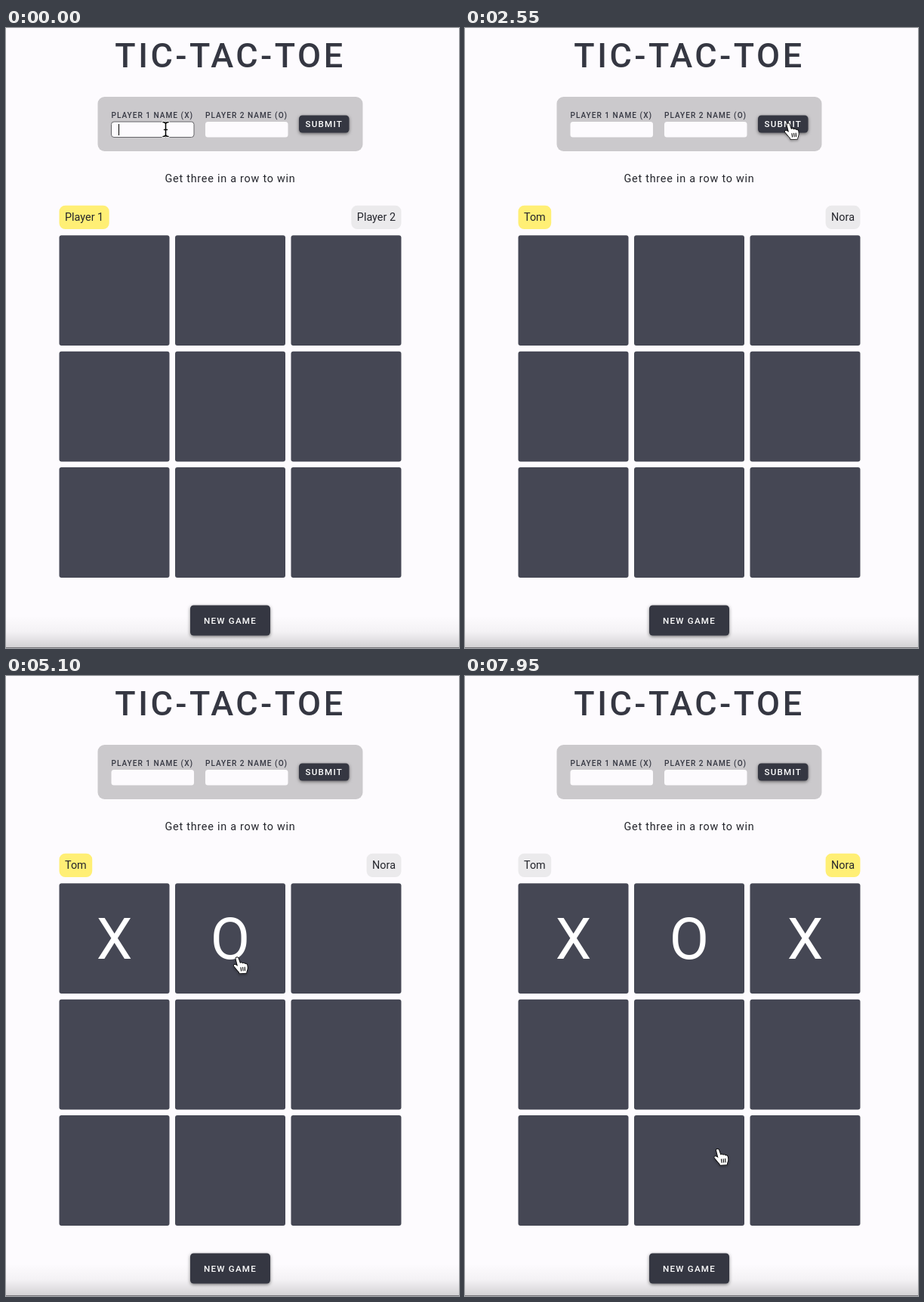
Recreate the animation shown at these times as an HTML page with a canvas. Size 600 by 820 pixels, loop 8000 ms.

```html
<!DOCTYPE html>
<html lang="en">
<head>
<meta charset="utf-8">
<title>Tic-Tac-Toe</title>
<style>
  html, body { margin: 0; width: 100%; height: 100%; overflow: hidden; background: #fdfbfe; }
  canvas { display: block; }
</style>
</head>
<body>
<canvas id="stage" width="600" height="820"></canvas>
<script>
const ctx = document.getElementById('stage').getContext('2d');
const LOOP = 8000, STEP = 50;
const DARK = '#353742', TILE = '#454754', PAPER = '#fdfbfe';
const NAMES = ['Tom', 'Nora'];
const KEY_TIMES = [[50, 200, 450], [1000, 1100, 1250, 1350]];
const FOCUS_CHANGE = 650, SUBMIT = 2350;
const MOVES = [[3850, 'X', 0], [4950, 'O', 1], [6700, 'X', 2]];

const FIELDS = [139.5, 264].map(x => ({ x, y: 124, w: 109.5, h: 20.5 }));
const SUBMIT_BUTTON = { x: 388, y: 115.5, w: 66.5, h: 23 };
const NEW_BUTTON = { x: 244, y: 763.5, w: 106, h: 40 };
const TILES = Array.from({ length: 9 }, (_, i) => ({
  x: 70.5 + 153.5 * (i % 3), y: 274.3 + 153.4 * Math.floor(i / 3), w: 146, h: 145.8
}));

const ease = {
  hold: () => 0,
  linear: p => p,
  start: p => p ** 1.4,
  stop: p => 1 - (1 - p) ** 2,
  both: p => p * p * (3 - 2 * p)
};
// Pointer stops: time, x, y, and the easing used to arrive there
const PATH = [
  [0, 211.5, 134], [1450, 211.5, 134, 'hold'], [1700, 307.5, 133, 'start'],
  [1800, 340, 132, 'linear'], [2150, 428, 128, 'stop'], [2650, 428, 128, 'hold'],
  [3200, 213, 352, 'both'], [3500, 185, 360, 'stop'], [3900, 185, 360, 'hold'],
  [4450, 220, 364, 'start'], [4700, 306, 374, 'stop'], [5900, 306, 374, 'hold'],
  [6150, 428.5, 368, 'start'], [6350, 450.5, 372, 'stop'], [7100, 450.5, 372, 'hold'],
  [7800, 368, 566, 'start'], [7950, 334.5, 627.5, 'linear'], [LOOP, 334.5, 627.5, 'hold']
];

const HAND = new Path2D('M-1.5 0C-2-2 .8-2.6 1.6-.8L4 6C4.8 4.8 6.8 4.8 7.3 6.3C8.3 5.3 10 5.6 10.4 7' +
  'C11.5 6.2 13 6.8 13.3 8.2L13.8 11.5C14 14 12.5 16 12.3 18.7L3.5 19.3C3 17 0 15-2 12' +
  'C-3 10.5-4.8 9.5-4 8.2C-3 7-1 8 1 10Z');
const HAND_LINES = new Path2D('M5 11.5L5.6 16M7.6 11.2L8.1 15.8M10.2 11L10.5 15.5');
const ARROW = new Path2D('M0 0V17.5L4 13.8L7.4 21.5L10.7 20L7.3 12.5H12.5Z');
const IBEAM = new Path2D('M-3.5-9.5Q0-9.5 0-7Q0-9.5 3.5-9.5M0-7V7M-3.5 9.5Q0 9.5 0 7Q0 9.5 3.5 9.5M-2 .5H2');

const clamp = v => Math.max(0, Math.min(1, v));
const fade = (t, start) => clamp((t - start + STEP) / 150);
const inside = (b, x, y) => x >= b.x && x <= b.x + b.w && y >= b.y && y <= b.y + b.h;
const mix = (a, b, p) => `rgb(${a.map((v, i) => Math.round(v + (b[i] - v) * p))})`;

function box({ x, y, w, h }, radius, fill, stroke) {
  ctx.beginPath();
  ctx.roundRect(x, y, w, h, radius);
  ctx.fillStyle = fill;
  ctx.fill();
  if (stroke) {
    ctx.strokeStyle = stroke;
    ctx.lineWidth = 1;
    ctx.stroke();
  }
}

function text(string, x, y, font, color, { spacing = 0, align = 'left' } = {}) {
  ctx.font = font;
  ctx.letterSpacing = spacing + 'px';
  ctx.textAlign = align;
  ctx.fillStyle = color;
  ctx.fillText(string, x, y);
  return ctx.measureText(string).width;
}

function shadow(color, blur, y) {
  ctx.shadowColor = color;
  ctx.shadowBlur = blur;
  ctx.shadowOffsetY = y;
}
const noShadow = () => shadow('transparent', 0, 0);

function button(b, label, baseline) {
  shadow('rgba(0,0,0,.5)', 4, 1.5);
  box(b, 4.5, DARK);
  noShadow();
  text(label, b.x + b.w / 2, baseline, '500 11.6px Roboto, sans-serif', '#fff', { spacing: 1.2, align: 'center' });
}

function drawForm(t) {
  box({ x: 121.5, y: 91, w: 351, h: 72 }, 9, '#cbc9cc');
  const focused = t < FOCUS_CHANGE ? 0 : t < SUBMIT ? 1 : -1;
  FIELDS.forEach((field, i) => {
    text(`PLAYER ${i + 1} NAME (${'XO'[i]})`, field.x, 118.7, '500 10.1px Roboto, sans-serif', DARK, { spacing: 1.01 });
    const active = focused === i;
    box(field, 3.5, PAPER, active && '#66666a');
    const typed = t < SUBMIT ? NAMES[i].slice(0, KEY_TIMES[i].filter(k => t >= k).length) : '';
    const width = text(typed, field.x + 9.3, 139, '13px "Liberation Sans", Arial, sans-serif', '#000');
    if (active) ctx.fillRect(Math.round(field.x + 9.3 + width), 127, 1, 15);
  });
  button(SUBMIT_BUTTON, 'SUBMIT', 131);
}

function drawChips(t) {
  const turn = MOVES.reduce((sum, [start], i) => sum + fade(t, start) * (i % 2 ? -1 : 1), 0);
  const font = '14.4px Roboto, sans-serif';
  [1 - turn, turn].forEach((glow, i) => {
    const label = t < SUBMIT ? `Player ${i + 1}` : NAMES[i];
    ctx.font = font;
    ctx.letterSpacing = '0px';
    const w = ctx.measureText(label).width + 15;
    const x = i ? 523.5 - w : 70.5;
    box({ x, y: 234.7, w, h: 31.3 }, 8, mix([235, 234, 236], [255, 239, 117], glow));
    text(label, x + 7.5, 255.2, font, '#24252c');
  });
}

function drawBoard(t) {
  TILES.forEach(tile => box(tile, 3, TILE));
  for (const [start, mark, i] of MOVES) {
    ctx.globalAlpha = fade(t, start);
    text(mark, TILES[i].x + 73, 374, '76px Roboto, sans-serif', '#fff', { align: 'center' });
  }
  ctx.globalAlpha = 1;
}

function drawPointer(t) {
  if (t >= KEY_TIMES[0][0] && t < 1450) return; // hidden while typing
  const n = PATH.findIndex(stop => stop[0] > t);
  const [t0, x0, y0] = PATH[n - 1], [t1, x1, y1, easing] = PATH[n];
  const p = ease[easing]((t - t0) / (t1 - t0));
  const x = x0 + (x1 - x0) * p, y = y0 + (y1 - y0) * p;
  const over = b => inside(b, x, y);

  ctx.save();
  ctx.translate(x, y);
  ctx.lineJoin = ctx.lineCap = 'round';
  if (FIELDS.some(over)) {
    for (const [width, color] of [[3.4, '#fff'], [1.5, '#000']]) {
      ctx.lineWidth = width;
      ctx.strokeStyle = color;
      ctx.stroke(IBEAM);
    }
  } else {
    const hand = [SUBMIT_BUTTON, NEW_BUTTON, ...TILES].some(over);
    const shape = hand ? HAND : ARROW;
    shadow('rgba(0,0,0,.45)', 3, 1.5);
    ctx.lineWidth = hand ? 1.5 : 2.4;
    ctx.strokeStyle = hand ? '#000' : '#fff';
    ctx.stroke(shape);
    noShadow();
    ctx.fillStyle = hand ? '#fff' : '#000';
    ctx.fill(shape);
    if (hand) {
      ctx.lineWidth = 1.1;
      ctx.stroke(HAND_LINES);
    }
  }
  ctx.restore();
}

function drawBackground() {
  ctx.fillStyle = PAPER;
  ctx.fillRect(0, 0, 600, 820);
  const shade = ctx.createLinearGradient(0, 778, 0, 820);
  shade.addColorStop(0, 'rgba(0,0,0,0)');
  shade.addColorStop(.5, 'rgba(0,0,0,.04)');
  shade.addColorStop(1, 'rgba(0,0,0,.17)');
  ctx.fillStyle = shade;
  ctx.fillRect(0, 778, 600, 42);
  ctx.fillStyle = '#77767a';
  ctx.fillRect(0, 819, 600, 1);
}

function draw(t) {
  drawBackground();
  text('TIC-TAC-TOE', 297, 52, '500 45px Roboto, sans-serif', DARK, { spacing: 3.6, align: 'center' });
  drawForm(t);
  text('Get three in a row to win', 297, 203.7, '14.4px Roboto, sans-serif', '#24252c', { spacing: .75, align: 'center' });
  drawChips(t);
  drawBoard(t);
  button(NEW_BUTTON, 'NEW GAME', 787.5);
  drawPointer(t);
}

const begin = performance.now();
function frame() {
  const t = (performance.now() - begin) % LOOP;
  draw(Math.floor(t / STEP) * STEP);
  requestAnimationFrame(frame);
}
frame();
</script>
</body>
</html>
```
